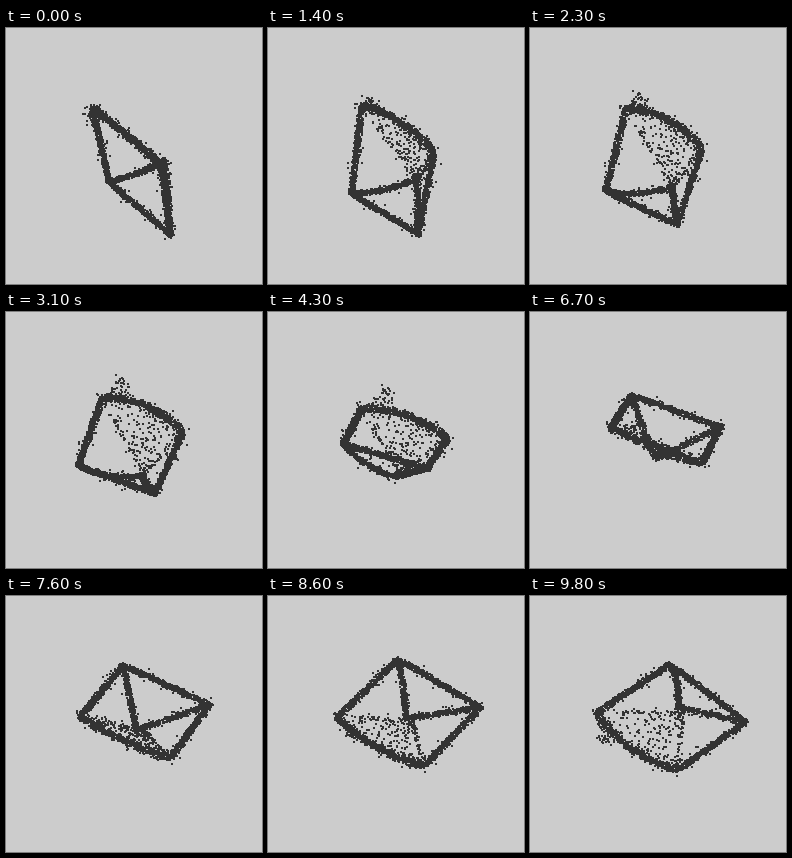
An HTML page with a canvas that plays this animation: 256x256 px, repeating every 10 s.

```html
<!DOCTYPE html>
<html lang="en">
<head>
<meta charset="utf-8">
<title>Turning envelope</title>
<style>
  html, body { margin: 0; width: 100%; height: 100%; overflow: hidden; background: #ccc; }
  canvas { display: block; width: 256px; height: 256px; image-rendering: pixelated; }
</style>
</head>
<body>
<canvas id="stage" width="256" height="256"></canvas>
<script>
const LOOP = 10000;
const RAD = Math.PI / 180;
const TURN = 2.73 * RAD;   // turn per step
const AXIS = 30.7 * RAD;   // direction of the axis on the stage
const TILT = 0.37;         // how far the axis leans towards the viewer
const CENTER = [132.4, 129.6];

const ctx = document.getElementById('stage').getContext('2d');

// Each point: distance along the axis, then its place across it.
const P = [-59, -19.4, 15.7];
const Q = [-30, 35.7, -45.7];
const R = [57, 49.9, -27.6];
const S = [33.5, -6.4, 30.3];
const tip = [13, -11, -31];
const left = [-7, 12, -43];
const bow = [-13, -14, 33];
const fold = [17, -6, -27];
const tuft = [-45, -10, 44];

let seed = 4177;
function rand() {
  seed = (seed * 1664525 + 1013904223) >>> 0;
  return seed / 4294967296;
}

const mix = (a, b, k) => a.map((v, i) => v + (b[i] - v) * k);

// Curve from a to b that passes through m halfway.
function bend(a, m, b, k) {
  const c = m.map((v, i) => 2 * v - (a[i] + b[i]) / 2);
  return mix(mix(a, c, k), mix(c, b, k), k);
}

// Random offset inside a ball; some dots stray further out.
function scatter(spread, stray) {
  const up = 2 * rand() - 1, angle = 2 * Math.PI * rand();
  let reach = spread * Math.cbrt(rand());
  if (rand() < stray) reach *= 1 + 1.7 * rand();
  const flat = Math.sqrt(1 - up * up);
  return [up, flat * Math.cos(angle), flat * Math.sin(angle)].map(v => v * reach);
}

const dots = [];
function addDots(count, spread, stray, place) {
  for (let i = 0; i < count; i++) {
    const point = place(rand());
    const off = scatter(spread, stray);
    dots.push(point.map((v, j) => v + off[j]));
  }
}

const line = (a, b) => k => mix(a, b, k);
const rim = k => bend(P, bow, S, k);

// sheet
addDots(560, 3.4, 0.1, line(Q, R));
addDots(500, 3.4, 0.1, line(P, Q));
addDots(500, 3.4, 0.1, line(R, S));
addDots(560, 3.9, 0.18, rim);
// flap
addDots(360, 3.3, 0.08, k => bend(Q, left, tip, k));
addDots(360, 3.3, 0.08, line(tip, R));
// thin inner fold, fading away from the rim
addDots(45, 2.6, 0.2, line(P, fold));
addDots(45, 3, 0.2, line(S, fold));
addDots(190, 3, 0.2, k => mix(rim(k), fold, Math.pow(rand(), 2)));
// loose dots near one corner
addDots(45, 4, 0.3, k => mix(rim(0.3 * k), tuft, rand()));

function project([along, y, z], sin, cos) {
  const u = along - TILT * (y * sin + z * cos);
  const v = y * cos - z * sin;
  return [
    CENTER[0] + u * Math.cos(AXIS) - v * Math.sin(AXIS),
    CENTER[1] + u * Math.sin(AXIS) + v * Math.cos(AXIS)
  ];
}

// Ten steps of 100 ms, the last one held twice as long.
function stepAt(time) {
  const round = Math.floor(time / 1100);
  return Math.min(90, round * 10 + Math.floor((time - round * 1100) / 100));
}

let shown = -1;
function draw(step) {
  const sin = Math.sin(step * TURN), cos = Math.cos(step * TURN);
  ctx.fillStyle = '#ccc';
  ctx.fillRect(0, 0, 256, 256);
  ctx.fillStyle = '#333';
  for (const dot of dots) {
    const [x, y] = project(dot, sin, cos);
    ctx.fillRect(Math.round(x - 1), Math.round(y - 1), 2, 2);
  }
}

function tick() {
  const step = stepAt(performance.now() % LOOP);
  if (step !== shown) draw(shown = step);
  requestAnimationFrame(tick);
}
tick();
</script>
</body>
</html>
```
